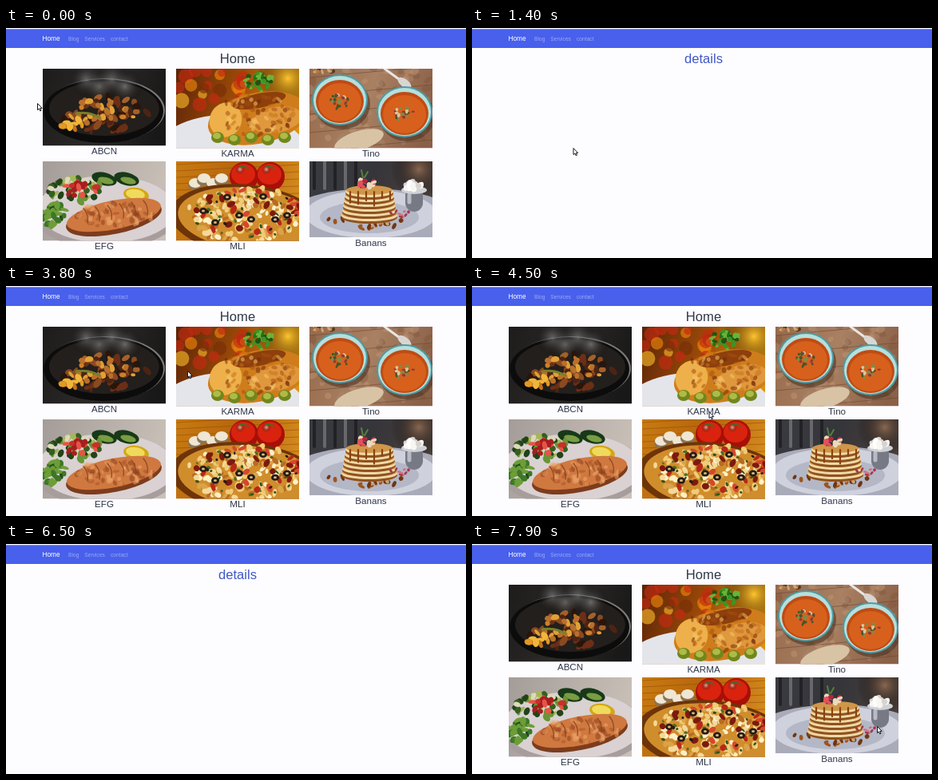
Write an HTML page with a canvas that moves like this. It is 576 px wide and 288 px high and loops after 8 s.

```html
<!DOCTYPE html>
<html lang="en">
<head>
<meta charset="utf-8">
<title>Food gallery</title>
<style>
html, body { margin: 0; width: 100%; height: 100%; overflow: hidden; background: #fdfcff; }
canvas { display: block; width: 576px; height: 288px; }
</style>
</head>
<body>
<canvas id="stage" width="576" height="288"></canvas>
<script>
const W = 576, H = 288, LOOP = 8000, STEP = 100;
const PHOTO_W = 154, INK = '#2f3848';
const stage = document.getElementById('stage').getContext('2d');
let g; // context being painted

let seed = 2024;
function random(from = 0, to = 1) {
  seed = (seed * 16807) % 2147483647;
  return from + (to - from) * seed / 2147483647;
}
const pick = list => list[Math.floor(random(0, list.length))];

function repeat(count, paint) {
  for (let i = 0; i < count; i++) paint(i);
}

function text(str, x, y, size, color, align = 'center') {
  g.font = `${size}px "Liberation Sans", Arial, sans-serif`;
  g.textAlign = align;
  g.fillStyle = color;
  g.fillText(str, x, y);
}

function oval(color, x, y, rx, ry = rx, turn = 0) {
  g.fillStyle = color;
  g.beginPath();
  g.ellipse(x, y, rx, ry, turn, 0, 2 * Math.PI);
  g.fill();
}

function line(color, width, path) {
  g.strokeStyle = color;
  g.lineWidth = width;
  g.lineCap = 'round';
  g.stroke(new Path2D(path));
}

function glow(color, x, y, r) {
  const light = g.createRadialGradient(x, y, 0, x, y, r);
  light.addColorStop(0, color);
  light.addColorStop(1, 'transparent');
  oval(light, x, y, r);
}

// Random small pieces inside an ellipse
function scatter(count, x, y, rx, ry, size, colors) {
  repeat(count, () => {
    const angle = random(0, 2 * Math.PI), reach = Math.sqrt(random());
    oval(pick(colors), x + Math.cos(angle) * reach * rx, y + Math.sin(angle) * reach * ry,
      size * random(.6, 1.2), size * random(.4, .8), random(0, Math.PI));
  });
}

// Softened picture in its grid cell, with the caption below
function photo(column, row, height, caption, backColors, paint) {
  const x = 46 + 167 * column, y = 51 + 116 * row;
  const back = g.createLinearGradient(0, 0, PHOTO_W, height / 2);
  backColors.forEach((c, i) => back.addColorStop(i / (backColors.length - 1), c));
  g.save();
  g.translate(x, y);
  g.beginPath();
  g.rect(0, 0, PHOTO_W, height);
  g.clip();
  g.fillStyle = back;
  g.fillRect(0, 0, PHOTO_W, height);
  g.filter = 'blur(.7px)';
  paint();
  g.restore();
  text(caption, x + PHOTO_W / 2, y + height + 10.6, 11.6, INK);
}

function pan() {
  oval('#7d7b77', 78, 52, 75, 40);
  oval('#0d0c0c', 76, 53, 75, 40);
  oval('#231f1c', 77, 50, 69, 34);
  repeat(4, i => glow('#b4b4b280', 55 + i * 16, 14 + 8 * (i % 2), 22));
  scatter(60, 77, 57, 54, 22, 6, ['#6b2f17', '#8a4a20', '#4d2413', '#a5602a', '#2b1409']);
  scatter(26, 70, 57, 45, 18, 4.5, ['#e0a136', '#c9822b', '#b8702c']);
  scatter(10, 38, 70, 14, 7, 5, ['#e39a22', '#f0b63c', '#c4731c']);
  line('#77802a', 3, 'M42 56Q57 53 71 61');
}

function chicken() {
  repeat(24, () => oval(pick(['#c32a10aa', '#e8820caa', '#f2b128aa', '#7a2f08aa']),
    random(0, 100), random(0, 55), random(5, 10)));
  glow('#ffc52e', 140, 12, 40);
  oval('#e4e5ea', 70, 97, 90, 40);
  oval('#cf7d1c', 102, 62, 63, 32, -.2);
  oval('#edb04a', 62, 64, 20, 22, .4);
  oval('#8d3f0c', 104, 40, 34, 9, -.2);
  oval('#e0983c', 126, 64, 32, 16, -.2);
  scatter(70, 100, 58, 50, 25, 4, ['#c7701b88', '#f5c76a88', '#70280988', '#a54c1088']);
  repeat(5, i => {
    oval('#71861c', 52 + i * 21, 86 + 3 * (i % 2), 8, 7);
    oval('#aebb48', 51 + i * 21, 84 + 3 * (i % 2), 5, 4);
  });
  scatter(32, 104, 16, 17, 11, 4, ['#24701a', '#3f9325', '#69b436', '#1d5414']);
}

function soupBowl(x, y) {
  oval('#4d352699', x + 3, y + 5, 35, 32);
  oval('#4f9ba3', x, y, 35, 32);
  oval('#b6dfdc', x, y, 33, 30);
  oval('#c04b14', x, y + 2, 30, 27);
  oval('#d7601d', x, y + 3, 27, 24);
  scatter(22, x, y + 2, 12, 10, 2.6, ['#44562a', '#7f8b47', '#8d3b35', '#d9c69a']);
}

function soup() {
  scatter(90, 77, 50, 90, 60, 6, ['#c79b7566', '#7d543a66', '#a98a7266']);
  repeat(5, i => line('#6b4a3599', 1, `M0 ${11 + i * 23}l154 -14`));
  oval('#d8c3a5', 62, 90, 32, 12, -.3);
  scatter(16, 18, 1, 14, 6, 3, ['#d4a66b', '#583421', '#b67947']);
  line('#e9e5e1', 3, 'M94 0l22 16');
  oval('#d9d5d2', 119, 18, 10, 5, .65);
  soupBowl(38, 39);
  soupBowl(119, 54);
}

function salmon() {
  oval('#a89d9d', 79, 64, 92, 46);
  oval('#d9d1d2', 80, 60, 87, 42);
  repeat(2, i => {
    oval('#173918', 77 + i * 28, 22, 16, 8, .25);
    oval('#7a9c42', 79 + i * 28, 24, 10, 4, .25);
  });
  scatter(50, 43, 36, 36, 15, 5, ['#355f20', '#699438', '#a4b856', '#ded8bb', '#23421a']);
  scatter(14, 50, 34, 22, 11, 5, ['#c7302a', '#e65446', '#a51f20']);
  scatter(35, 14, 67, 15, 15, 5, ['#214d1a', '#3d7727', '#6d9d38']);
  oval('#d4a713', 117, 42, 16, 9, .15);
  oval('#f0da5c', 116, 41, 12, 6, .15);
  oval('#7d3c1c', 89, 71, 61, 20, -.2);
  oval('#cf7840', 89, 67, 60, 18, -.2);
  scatter(60, 89, 67, 50, 15, 4, ['#a9522688', '#efad7188', '#8a3f1d88', '#e7995b88']);
  repeat(6, i => line('#8f4723', 1.2, `M${51 + i * 15} ${59 - i * 2}q7 8 5 18`));
}

function pizza() {
  repeat(7, i => line('#8f4c0b88', 1, `M0 ${4 + i * 8}l154 ${i - 9}`));
  repeat(2, i => {
    oval('#a80f08', 85 + i * 33, 19, 18);
    oval('#d9230f', 84 + i * 33, 16, 15, 13);
    glow('#ffb19a', 80 + i * 33, 10, 6);
    line('#446c20', 2, `M${80 + i * 33} 6l10 2`);
  });
  repeat(4, i => {
    oval('#8d7452', 24 + i * 11, 30 - 6 * (i % 2), 9, 7);
    oval('#efe6d4', 24 + i * 11, 27 - 6 * (i % 2), 8, 6);
  });
  oval('#6d3409', 88, 73, 96, 44, .1);
  oval('#d08d2c', 90, 72, 88, 39, .1);
  scatter(170, 90, 67, 78, 34, 4.5, ['#f3d99a', '#dba348', '#fff0c6', '#b86b22', '#f0cc78']);
  scatter(34, 90, 63, 70, 28, 5, ['#b82817', '#d7472a', '#7c1a0e']);
  scatter(36, 90, 66, 70, 30, 2.5, ['#477020', '#241c18', '#305318']);
  repeat(8, i => {
    const x = 34 + i * 15, y = 62 + 18 * Math.sin(i * 2.2);
    oval('#241c18', x, y, 5, 4);
    oval('#d9b878', x, y, 2, 1.5);
  });
}

function pancakes() {
  repeat(5, i => line(i % 2 ? '#68676c' : '#222226', 4, `M${6 + i * 13} 0v34`));
  glow('#8a6852', 137, 10, 35);
  oval('#a9abb9', 77, 72, 110, 38);
  oval('#cfd1dd', 77, 66, 82, 30);
  oval('#b4b7c6', 75, 70, 62, 20);
  scatter(26, 72, 76, 52, 10, 4, ['#9d551d', '#713611', '#c9a27a']);
  repeat(6, i => {
    const y = 68 - i * 6, rx = 35 - i;
    oval('#8f5220', 75, y + 2, rx, 8);
    oval('#f0d9a6', 75, y, rx, 7);
    oval('#d0964a', 75, y - 2, rx - 1, 6);
  });
  repeat(6, i => line('#8a430f', 2.2, `M${51 + i * 10} 38v${random(8, 28)}`));
  scatter(14, 71, 26, 13, 6, 4, ['#b92537', '#e1525c', '#28304c', '#ecd9ba']);
  line('#54813e', 2, 'M67 20l-2 -9M69 20l4 -7');
  line('#777a84', 22, 'M131 42v10');
  line('#b9bbc4', 5, 'M125 42v9');
  oval('#cfd1d6', 131, 36, 16, 5);
  scatter(20, 130, 30, 11, 6, 5, ['#f8f6f2', '#d8d3d0', '#ffffff']);
  scatter(8, 114, 66, 14, 4, 3, ['#a73750', '#ce7182']);
}

function page(title, titleColor, paint = () => {}) {
  const sheet = document.createElement('canvas');
  sheet.width = W;
  sheet.height = H;
  g = sheet.getContext('2d');
  g.fillStyle = '#fdfcff';
  g.fillRect(0, 0, W, H);
  g.fillStyle = '#4860ec';
  g.fillRect(0, 1.3, W, 23.7);
  text('Home', 45.5, 16.3, 8.3, '#fff', 'left');
  text('Blog', 78, 16, 6.7, '#9aa8f5', 'left');
  text('Services', 98.3, 16, 6.7, '#9aa8f5', 'left');
  text('contact', 131, 16, 6.7, '#9aa8f5', 'left');
  text(title, 290, 43.5, 16.6, titleColor);
  paint();
  return sheet;
}

const home = page('Home', INK, () => {
  photo(0, 0, 96.5, 'ABCN', ['#1d1c1b', '#2b2a28', '#191818'], pan);
  photo(1, 0, 99.5, 'KARMA', ['#5b2408', '#9c4a08', '#dd920f'], chicken);
  photo(2, 0, 99.5, 'Tino', ['#95694c', '#a98062', '#8a6047'], soup);
  photo(0, 1, 99.5, 'EFG', ['#a39c98', '#b8afa9', '#c9c1b8'], salmon);
  photo(1, 1, 99.5, 'MLI', ['#c87b12', '#b5640c', '#d58c1e'], pizza);
  photo(2, 1, 95, 'Banans', ['#3a3b40', '#35353a', '#4c403b'], pancakes);
});
const details = page('details', '#4058c6');

// Pointer: rests on a dish, goes off the top to the back button, returns
const backButton = [15, -50], firstDish = [126.5, 150], secondDish = [296.5, 157];
const moves = [
  { start: 200, end: 1000, from: [39, 94], to: firstDish },
  { start: 2100, end: 2700, from: firstDish, to: backButton },
  { start: 3500, end: 4200, from: backButton, to: secondDish },
  { start: 5200, end: 6000, from: secondDish, to: backButton },
  { start: 7200, end: 7900, from: [580, 290], to: [507, 228] }
];

function pointerAt(t) {
  const { start, end, from, to } = moves.findLast(m => t >= m.start) || moves[0];
  const p = Math.min(1, Math.max(0, (t - start) / (end - start)));
  const eased = 1 - (1 - p) ** 2.5;
  return from.map((v, i) => v + (to[i] - v) * eased);
}

const arrow = new Path2D('M.5 .5V8.6L2.4 7L3.7 9.8L5 9.2L3.8 6.4H6.2Z');

function draw(now) {
  const t = Math.floor(now % LOOP / STEP) * STEP;
  const onDetails = (t >= 1400 && t < 3600) || (t >= 5100 && t < 6600);
  stage.drawImage(onDetails ? details : home, 0, 0);
  stage.save();
  stage.translate(...pointerAt(t));
  stage.fillStyle = '#fff';
  stage.strokeStyle = '#15151b';
  stage.fill(arrow);
  stage.stroke(arrow);
  stage.restore();
}

const start = performance.now();
function tick() {
  draw(performance.now() - start);
  requestAnimationFrame(tick);
}
tick();
</script>
</body>
</html>
```
